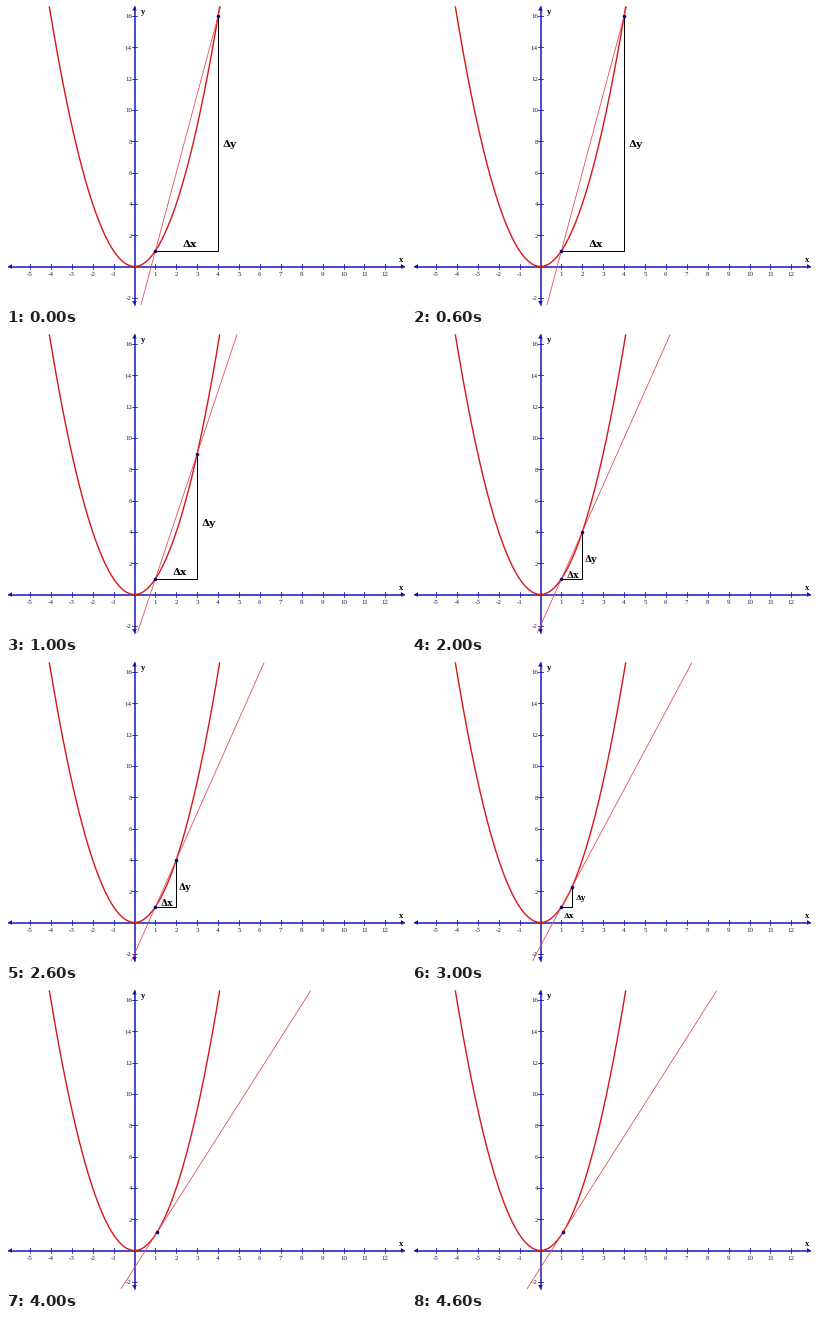
Recreate the animation shown at these times as a matplotlib script. Size 400x300 px, loop 5 s.

```python
import numpy as np
import matplotlib.pyplot as plt
from matplotlib.animation import FuncAnimation

W, H, DPI = 400, 300, 100
PX = 72 / DPI                      # points per pixel
X0, Y0, UX, UY = 128.5, 260.5, 20.9, 15.65
TOP, BOTTOM = 1, 298.5
BLUE, RED, NAVY = "#1414b4", "#d8161c", "#0a0a78"

# second point, label size, centre/baseline of the two labels
STEPS = [
    (4.0, 10.5, (184, 241), (224, 141)),
    (3.0, 10.5, (174, 241), (202.5, 192)),
    (2.0, 9.2, (161.5, 243.5), (179, 228)),
    (1.5, 7.7, (157, 255.5), (169, 237.5)),
    (1.1, 0, None, None),
]


def sx(x):
    return X0 + UX * x


def sy(y):
    return Y0 - UY * y


fig = plt.figure(figsize=(W / DPI, H / DPI), dpi=DPI, facecolor="white")
ax = fig.add_axes([0, 0, 1, 1])
ax.set_xlim(0, W)
ax.set_ylim(H, 0)
ax.axis("off")


def line(xs, ys, color, width, **kw):
    return ax.plot(xs, ys, color=color, lw=width * PX, **kw)[0]


def text(x, y, s, size, family="Liberation Serif", **kw):
    return ax.text(x, y, s, fontsize=size * PX, family=family,
                   va="baseline", **kw)


def arrow(x, y, dx, dy):
    """Small solid arrowhead with its tip at (x, y)."""
    bx, by = x - 4 * dx, y - 4 * dy
    ax.fill([x, bx + 2.4 * dy, bx - 2.4 * dy],
            [y, by + 2.4 * dx, by - 2.4 * dx], color=BLUE, lw=0)


# axes
line([3, 398], [Y0, Y0], BLUE, 1.5)
line([X0, X0], [TOP, BOTTOM], BLUE, 1.5)
arrow(399, Y0, 1, 0)
arrow(2, Y0, -1, 0)
arrow(X0, 0.5, 0, -1)
arrow(X0, 299, 0, 1)
for i in range(-5, 13):
    if i:
        line([sx(i)] * 2, [Y0 - 2.5, Y0 + 2.5], BLUE, 0.8)
        text(sx(i), 269.5, str(i), 7, ha="center", color="#20202c")
for j in range(-2, 17, 2):
    if j:
        line([X0 - 2.5, X0 + 2.5], [sy(j)] * 2, BLUE, 0.8)
        text(126, sy(j) + 2.3, str(j), 7, ha="right", color="#20202c")
text(395, 256, "x", 8.5, ha="center", weight="bold")
text(136.5, 8, "y", 8.5, ha="center", weight="bold")

# parabola
edge = np.sqrt((Y0 - TOP) / UY)
xs = np.linspace(-edge, edge, 300)
line(sx(xs), sy(xs ** 2), RED, 1.4, zorder=3)

secant = line([], [], "#e04a4e", 0.8, zorder=4)
legs = line([], [], "black", 1, zorder=5, solid_joinstyle="miter")
dots = ax.plot([], [], "o", ms=3.6 * PX, color=NAVY, mew=0, zorder=6)[0]
labels = [text(0, 0, s, 10, "DejaVu Serif", weight="bold", ha="center",
               zorder=7) for s in ("Δx", "Δy")]


def draw(i):
    b, size, *spots = STEPS[i]
    ys = np.array([TOP, BOTTOM])
    secant.set_data(sx(1 + ((Y0 - ys) / UY - 1) / (1 + b)), ys)
    if size:
        legs.set_data([sx(1), sx(b), sx(b)], [sy(1), sy(1), sy(b * b)])
        pts = np.array([1, b])
    else:
        legs.set_data([], [])
        pts = np.array([b])
    dots.set_data(sx(pts), sy(pts ** 2))
    for label, spot in zip(labels, spots):
        label.set_visible(spot is not None)
        if spot:
            label.set_position(spot)
            label.set_fontsize(size * PX)
    return [secant, legs, dots, *labels]


anim = FuncAnimation(fig, draw, frames=len(STEPS), interval=1000,
                     repeat=True, repeat_delay=0)
plt.show()
```
